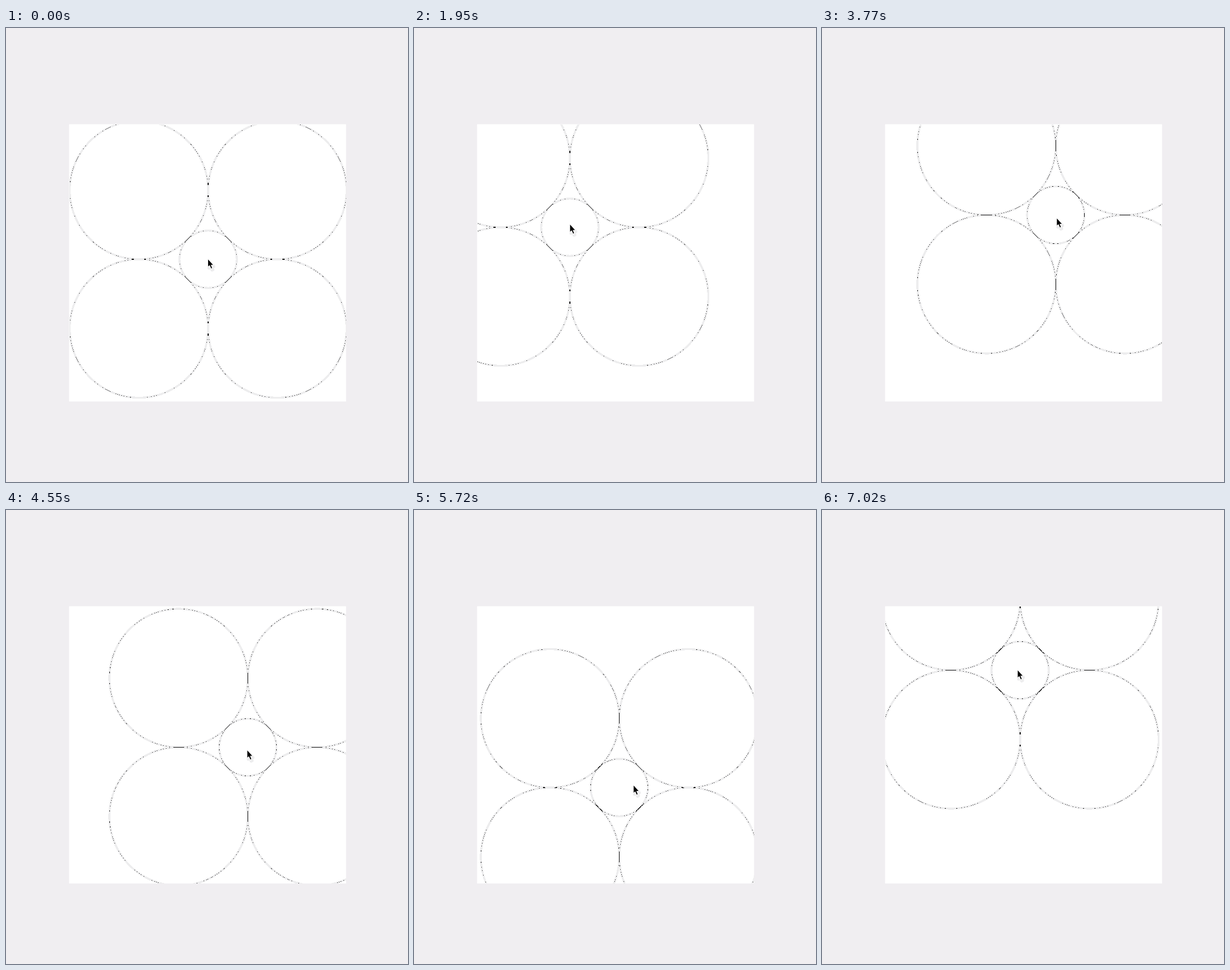
These frames come from a looping animation (704 by 795 pixels, 7.15 s). An HTML page with a canvas:

```html
<!DOCTYPE html>
<html lang="en">
<head>
<meta charset="utf-8">
<title>Circles following a pointer</title>
<style>
  html, body { margin: 0; width: 100%; height: 100%; overflow: hidden; background: #f0eef1; }
  canvas { position: absolute; left: 0; top: 0; width: 704px; height: 795px; }
</style>
</head>
<body>
<canvas id="stage" width="704" height="795"></canvas>
<script>
const ctx = document.getElementById('stage').getContext('2d', { willReadFrequently: true });
const STEP = 130, STEPS = 55;
const BOX = { x: 111, y: 169, size: 485 };
const BIG = 121.2, SMALL = BIG * (Math.SQRT2 - 1);
const SOFT = 1.7;  // half width of a line
const SOLID = 0.95; // ink from which a pixel turns dark
const LEAD = 0.5;  // how far the pointer runs ahead of the circles, in steps
const PALE = [237, 237, 238], DARK = [24, 24, 24];

// Key points of the drag: step, x, y
const keys = [
  [0, 354, 405], [5, 351, 410.5], [10.5, 351, 410.5], [15, 273, 349],
  [23, 327.5, 292.5], [28, 405, 318], [35, 423.5, 415.5], [38, 400, 446],
  [40, 346, 470], [42, 297, 493], [46, 445, 470], [48, 478.5, 427],
  [50, 464, 380], [52, 405, 296], [54, 347, 280.5], [55, 341, 281]
];

const slope = (i, axis) =>
  (keys[i + 1][axis] - keys[i][axis]) / (keys[i + 1][0] - keys[i][0]);

// Harmonic mean of both neighbouring slopes; flat at turning points and ends
function tangent(i, axis) {
  if (i === 0 || i === keys.length - 1) return 0;
  const a = slope(i - 1, axis), b = slope(i, axis);
  return a * b > 0 ? 2 * a * b / (a + b) : 0;
}

function pointAt(step) {
  let i = 0;
  while (i < keys.length - 2 && keys[i + 1][0] <= step) i++;
  const span = keys[i + 1][0] - keys[i][0];
  const u = (step - keys[i][0]) / span, v = 1 - u;
  return [1, 2].map(axis =>
    v * v * (1 + 2 * u) * keys[i][axis] + u * u * (3 - 2 * u) * keys[i + 1][axis] +
    span * u * v * (v * tangent(i, axis) - u * tangent(i + 1, axis)));
}

// Two-tone rings: pale where a soft line passes, dark where it is strongest
function drawRings(cx, cy) {
  const { x: left, y: top, size } = BOX;
  const image = ctx.getImageData(left, top, size, size);
  const rings = [[cx, cy, SMALL]];
  for (const dx of [-BIG, BIG])
    for (const dy of [-BIG, BIG]) rings.push([cx + dx, cy + dy, BIG]);

  for (let y = 0, p = 0; y < size; y++) {
    for (let x = 0; x < size; x++, p += 4) {
      let clear = 1;
      for (const [rx, ry, r] of rings) {
        const dx = left + x + 0.5 - rx, dy = top + y + 0.5 - ry;
        const d = Math.abs(Math.sqrt(dx * dx + dy * dy) - r);
        if (d < SOFT) clear *= d / SOFT;
      }
      if (clear < 1) image.data.set(1 - clear > SOLID ? DARK : PALE, p);
    }
  }
  ctx.putImageData(image, left, top);
}

const arrow = new Path2D('M0 0V12.4L2.8 10.1L5.4 15.8L7 15L4.7 9.5H8.6Z');

function drawPointer(x, y) {
  ctx.save();
  ctx.translate(x, y);
  ctx.lineJoin = 'round';
  ctx.save();
  ctx.beginPath();
  ctx.rect(-10, 5, 40, 30);
  ctx.clip();
  ctx.translate(1.5, 3);
  ctx.strokeStyle = ctx.fillStyle = `rgb(${PALE})`;
  ctx.lineWidth = 5;
  ctx.stroke(arrow);
  ctx.fill(arrow);
  ctx.restore();
  ctx.strokeStyle = '#fff';
  ctx.lineWidth = 2;
  ctx.stroke(arrow);
  ctx.fillStyle = '#000';
  ctx.fill(arrow);
  ctx.restore();
}

let shown = -1;
const start = performance.now();

function tick() {
  const step = Math.floor((performance.now() - start) / STEP) % STEPS;
  if (step !== shown) {
    shown = step;
    ctx.clearRect(0, 0, 704, 795);
    ctx.fillStyle = '#fff';
    ctx.fillRect(BOX.x - 0.5, BOX.y - 0.5, BOX.size, BOX.size + 0.5);
    drawRings(...pointAt(step));
    drawPointer(...pointAt(step + LEAD));
  }
  requestAnimationFrame(tick);
}
tick();
</script>
</body>
</html>
```
